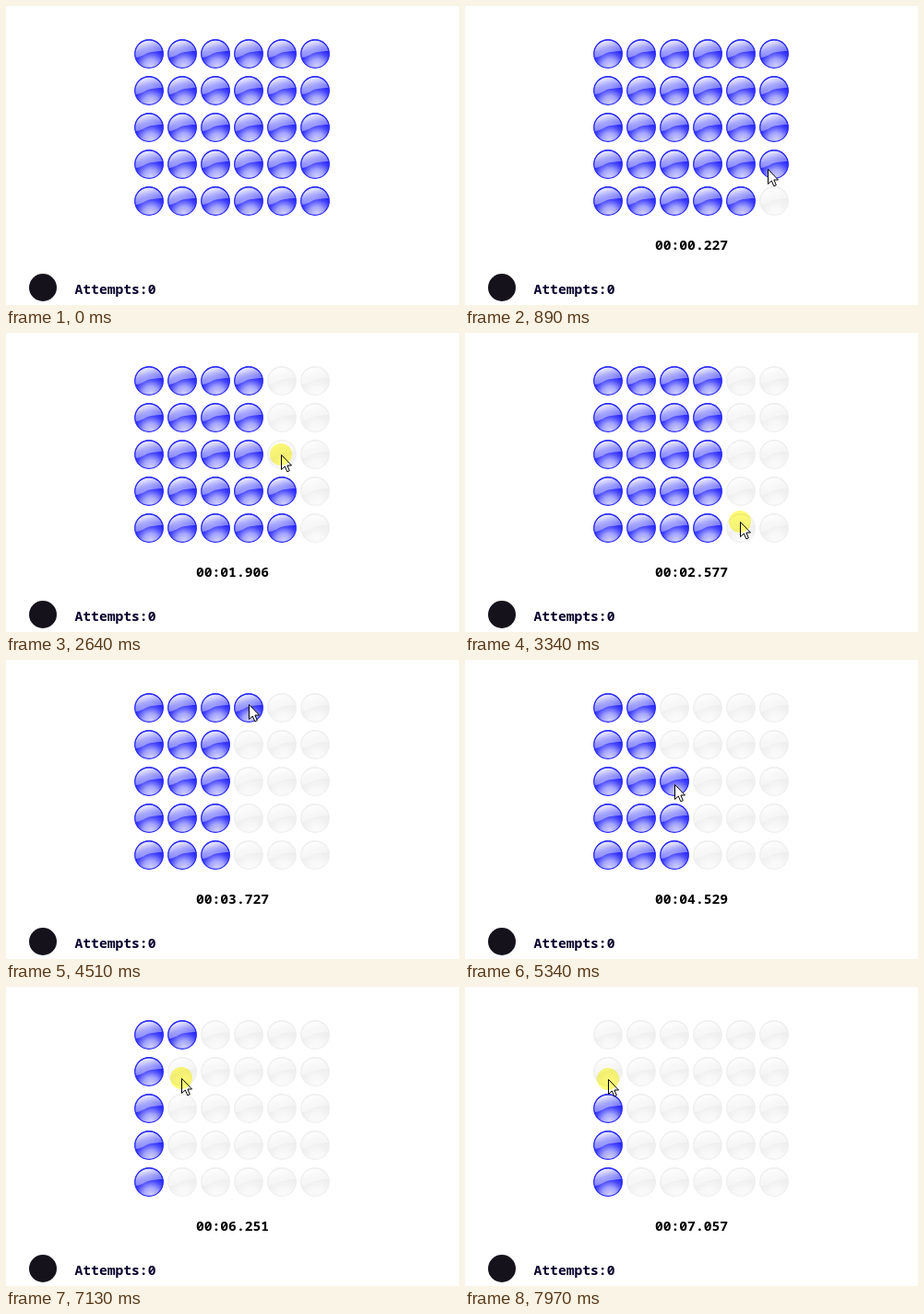
These frames come from a looping animation (491x325 px, 8 s). An HTML page:

```html
<!DOCTYPE html>
<html lang="en">
<head>
<meta charset="utf-8">
<title>Ball clicker</title>
<style>
  html, body { margin: 0; width: 100%; height: 100%; overflow: hidden; background: #fff; }
  svg { display: block; width: 491px; height: 325px; }
  text { font: bold 14.67px "Noto Sans Mono", "DejaVu Sans Mono", monospace; }
  .gone { filter: grayscale(1); opacity: .08; }
  #glow { mix-blend-mode: multiply; }
</style>
</head>
<body>
<svg viewBox="0 0 491 325">
  <defs>
    <radialGradient id="body" gradientUnits="userSpaceOnUse" cx="2" cy="14" r="27">
      <stop offset="0" stop-color="#d2d2ff"/>
      <stop offset=".3" stop-color="#a4a4ff"/>
      <stop offset=".58" stop-color="#4545ff"/>
      <stop offset=".8" stop-color="#1c1cff"/>
      <stop offset="1" stop-color="#2c2cff"/>
    </radialGradient>
    <linearGradient id="gloss" gradientUnits="userSpaceOnUse" x1="-3" y1="-15" x2="3" y2="5">
      <stop offset="0" stop-color="#fff" stop-opacity=".95"/>
      <stop offset=".5" stop-color="#fff" stop-opacity=".55"/>
      <stop offset="1" stop-color="#fff" stop-opacity=".22"/>
    </linearGradient>
    <g id="ball">
      <circle r="15.5" fill="url(#body)"/>
      <path d="M-14.6 4C-8 4 -4 -1 3 -2S11 -3 14.6 -3A15 15 0 0 0 -14.6 4Z" fill="url(#gloss)"/>
      <circle r="15.3" fill="none" stroke="#2b2bf2" stroke-width="1.2"/>
    </g>
  </defs>
  <g id="balls"></g>
  <text id="timer" x="245.5" y="265" text-anchor="middle"></text>
  <circle cx="40" cy="306" r="15" fill="#15121c"/>
  <text x="74.5" y="313" fill="#06002c">Attempts:0</text>
  <g id="cursor">
    <path d="M.5 .5V16.5L4.3 13L6.8 18.8L9.3 17.7L6.9 12H11.5Z" fill="#fff" stroke="#000"/>
    <circle id="glow" r="12" fill="#fffb78"/>
  </g>
</svg>
<script>
const LOOP = 8000, COLS = 6, ROWS = 5;
const $ = id => document.getElementById(id);

// The screen refreshes in groups of steps, each starting at one of these times.
const groups = [70, 890, 1730, 2570, 3410, 4240, 5070, 5890, 6710, 7550, 8390];

// Clock readings drift slightly against playback time.
const clock = [[663, 0], [890, 227], [1870, 1167], [3340, 2577], [4510, 3727], [6230, 5388], [7970, 7057]];

const tipX = [155, 190, 227, 263, 298, 328];
const tipY = [47, 94.7, 132, 178.3, 205];
const lateClicks = { 4: 1790, 9: 3315, 21: 6510, 24: 7356 };

// The pointer snakes up and down the columns from the bottom right.
const clicks = Array.from({ length: 28 }, (_, k) => {
  const pass = Math.floor(k / ROWS), col = COLS - 1 - pass;
  const row = pass % 2 ? k % ROWS : ROWS - 1 - k % ROWS;
  return { time: lateClicks[k] || 663 + 280.9 * k, col, row, x: tipX[col], y: tipY[row] + (4 - col) * 4 / 3 };
});

const balls = [];
for (let row = 0; row < ROWS; row++) {
  for (let col = 0; col < COLS; col++) {
    const ball = document.createElementNS("http://www.w3.org/2000/svg", "use");
    ball.setAttribute("href", "#ball");
    ball.setAttribute("transform", `translate(${155 + 36 * col} ${52 + 40 * row})`);
    $("balls").append(ball);
    const hit = clicks.find(c => c.col === col && c.row === row);
    balls.push({ ball, goneAt: hit ? hit.time : Infinity });
  }
}

const clamp = v => Math.min(1, Math.max(0, v));
const smooth = v => v * v * (3 - 2 * v);
const mix = (a, b, p) => a + (b - a) * p;

function refreshTime(t) {
  if (t < groups[0]) return 0;
  const g = groups.findLastIndex(start => start <= t);
  const step = (groups[g + 1] - groups[g]) / (g ? 12 : 11);
  const at = i => groups[g] + Math.floor(i * step / 10 + 1e-6) * 10;
  let i = Math.floor((t - groups[g]) / step);
  if (at(i + 1) <= t) i++;
  return at(i);
}

function reading(t) {
  let i = clock.findLastIndex(([time]) => time <= t);
  i = Math.min(i, clock.length - 2);
  const [t0, v0] = clock[i], [t1, v1] = clock[i + 1];
  const ms = Math.round(mix(v0, v1, (t - t0) / (t1 - t0)));
  const pad = (n, size) => String(n).padStart(size, "0");
  return `00:${pad(Math.floor(ms / 1000), 2)}.${pad(ms % 1000, 3)}`;
}

function pointer(t) {
  const last = clicks.findLastIndex(c => c.time <= t);
  const next = clicks[last + 1];
  const from = last < 0 ? { x: 426, y: 316 } : clicks[last];
  const p = smooth(clamp(last < 0 ? (t - 70) / 540 : (t - from.time - 30) / 150));
  return {
    x: mix(from.x, next.x, p),
    y: mix(from.y, next.y, p),
    pressed: last >= 0 && t - from.time < 68
  };
}

function draw(now) {
  const t = refreshTime(now % LOOP);
  for (const { ball, goneAt } of balls) ball.classList.toggle("gone", t >= goneAt);
  $("timer").textContent = t < clock[0][0] ? "" : reading(t);
  const { x, y, pressed } = pointer(t);
  $("cursor").style.display = t < groups[0] ? "none" : "";
  $("cursor").setAttribute("transform", `translate(${Math.round(x)} ${Math.round(y)})`);
  $("glow").style.display = pressed ? "" : "none";
}

const begun = performance.now();
function tick() {
  draw(performance.now() - begun);
  requestAnimationFrame(tick);
}
tick();
</script>
</body>
</html>
```
